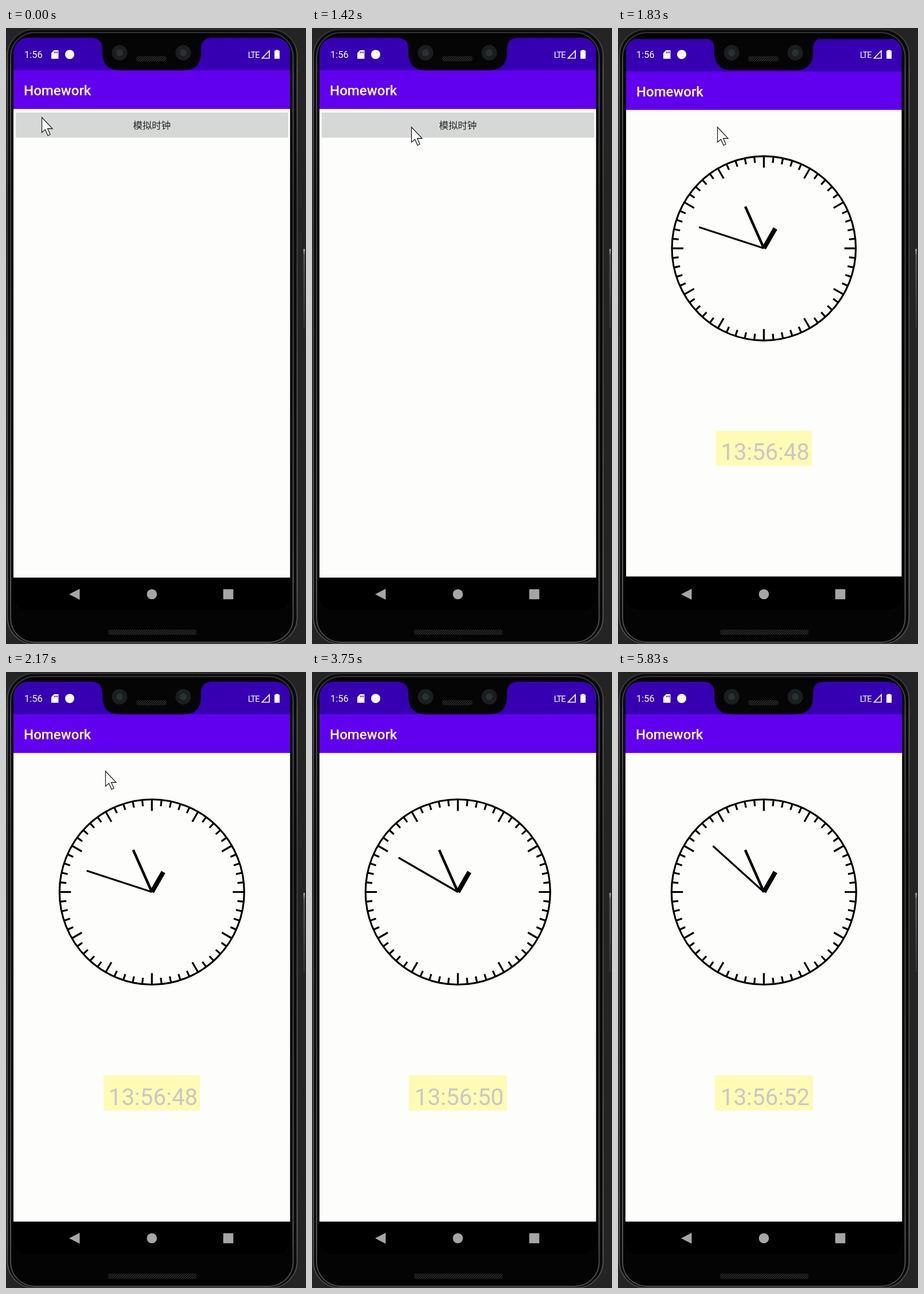
Recreate the animation shown at these times as an HTML page. Size 523 px wide and 1071 px high, loop 5.91 s.

```html
<!DOCTYPE html>
<html lang="zh">
<head>
<meta charset="utf-8">
<title>Homework</title>
<style>
html, body { margin: 0; width: 100%; height: 100%; overflow: hidden; background: #232323; }
svg { display: block; width: 100%; height: 100%; }
text { font-family: Roboto, sans-serif; }
.title { font-size: 24.1px; font-weight: 500; fill: #fff; }
.button { font: 16.4px "Noto Sans CJK SC", "Noto Sans CJK", sans-serif; fill: #222; }
</style>
</head>
<body>
<svg viewBox="0 0 523 1071">
  <defs>
    <clipPath id="screen"><rect x="13" y="17" width="482.5" height="995" rx="25"/></clipPath>
    <linearGradient id="rim" x2="0" y2="1">
      <stop offset="0" stop-color="#333"/><stop offset=".07" stop-color="#5c5c5c"/>
      <stop offset=".3" stop-color="#414141"/><stop offset=".9" stop-color="#606060"/>
      <stop offset="1" stop-color="#484848"/>
    </linearGradient>
    <linearGradient id="sideKey" x2="0" y2="1">
      <stop offset="0" stop-color="#bbb"/><stop offset=".08" stop-color="#5a5a5a"/><stop offset="1" stop-color="#333"/>
    </linearGradient>
    <pattern id="mesh" width="4" height="4" patternUnits="userSpaceOnUse">
      <rect width="4" height="4" fill="#0d0d0d"/><path d="M0 4L4 0" stroke="#444" stroke-width="1"/>
    </pattern>
    <g id="window">
      <rect x="13" y="17" width="482.5" height="57" fill="#3600b2"/>
      <rect x="13" y="73.5" width="482.5" height="68" fill="#6000ee"/>
      <rect x="13" y="140.8" width="482.5" height="815" fill="#fdfdfb"/>
      <rect x="13" y="955.7" width="482.5" height="57"/>
      <text class="title" x="31" y="117">Homework</text>
    </g>
  </defs>

  <!-- phone body -->
  <rect width="523" height="1071" fill="#242424"/>
  <rect x="518.5" y="384" width="2.5" height="138" rx="1" fill="url(#sideKey)"/>
  <rect x="2.5" y="2.5" width="505" height="1068" rx="46" fill="#0b0b0c" stroke="url(#rim)" stroke-width="1.8"/>
  <rect x="8" y="8" width="492.5" height="1060" rx="42" fill="#040405" stroke="url(#rim)" stroke-width="1.8"/>
  <rect x="178" y="1046" width="154" height="9" rx="3" fill="url(#mesh)"/>

  <g clip-path="url(#screen)">
    <rect x="13" y="17" width="482.5" height="995"/>
    <g id="menu">
      <use href="#window"/>
      <rect x="17" y="147.5" width="475" height="43" rx="2" fill="#c9cbcb"/>
      <rect x="17" y="147" width="475" height="43" rx="2" fill="#d6d8d8"/>
      <text class="button" x="254.3" y="175" text-anchor="middle">模拟时钟</text>
    </g>
    <g id="clock">
      <use href="#window"/>
      <g transform="translate(254.3 382.5)" stroke="#000" stroke-width="3.2" fill="none">
        <circle r="161"/>
        <g id="ticks"></g>
        <path d="M0 0V-40" stroke-width="8" transform="rotate(30)"/>
        <path d="M0 0V-80" stroke-width="4.5" transform="rotate(336)"/>
        <path id="secondHand" d="M0 0V-119.5"/>
      </g>
      <rect id="plate" y="701.5" height="61" fill="#fdfbb4"/>
      <text id="digits" y="752.5" font-size="40.3" text-anchor="middle" fill="#cac6c9"></text>
    </g>
  </g>

  <!-- notch -->
  <path d="M140 15V17H150Q167 18 168 35V44Q169 73.5 198 73.5H310Q339 73.5 340 44V35Q341 18 358 17H366V15Z" fill="#050505"/>
  <g fill="#1a1e1f">
    <circle cx="198" cy="43" r="13.5"/><circle cx="309" cy="43" r="13.5"/>
    <g fill="#2a3131"><circle cx="198" cy="43" r="6"/><circle cx="309" cy="43" r="6"/></g>
  </g>
  <rect x="227" y="49" width="53" height="9" rx="4" fill="url(#mesh)"/>

  <!-- status bar -->
  <g fill="#fff">
    <text x="32" y="52" font-size="16.4">1:56</text>
    <path d="M84 38.5H91.5V53.5H79V43.5Z"/>
    <path d="M84.5 41V44M87 41V44M89.5 41V44" stroke="#3600b2" stroke-width="1.2"/>
    <circle cx="111" cy="46" r="8"/>
    <text x="441.5" y="52" font-size="14.5" text-anchor="end" letter-spacing="-1">LTE</text>
    <path d="M446.5 52.5H459V39.5Z" fill="none" stroke="#fff" stroke-width="1.7"/>
    <path d="M470 38H475V39.5H477V53.5H468V39.5H470Z"/>
  </g>

  <!-- navigation bar -->
  <g fill="#a6a6a6">
    <path d="M110 984.5L128.5 975V994Z"/>
    <circle cx="254.3" cy="984.5" r="8.8"/>
    <rect x="378.7" y="975.7" width="17.6" height="17.6" rx="1"/>
  </g>

  <path id="cursor" d="M0 0V26L6 21L10.5 31.5L14.5 29.5L10 19.5H18.5Z" fill="#fff" stroke="#222" stroke-width="1.3"/>
</svg>
<script>
const LOOP = 5910, STEP = 250 / 3;
const $ = id => document.getElementById(id);

// Keyframes are [time, ...values], linear between neighbours.
function track(keys, t) {
  const next = keys.findIndex(key => key[0] > t);
  if (next < 0) return keys.at(-1).slice(1);
  if (next === 0) return keys[0].slice(1);
  const a = keys[next - 1], b = keys[next], u = (t - a[0]) / (b[0] - a[0]);
  return a.slice(1).map((v, i) => v + (b[i + 1] - v) * u);
}

const cursorPath = [
  [0, 62.5, 155.5], [170, 78, 158], [580, 160, 170], [750, 173.5, 172.5],
  [2250, 173.5, 172.5], [2420, 225, 125], [2670, 370, 5], [2750, 400, -40]
];
const opening = [[1620, 0], [1667, 0.06], [1750, 0.88], [1833, 0.97], [1917, 0.985], [2000, 0.995], [2080, 1]];

const zoom = s => `translate(254 514) scale(${s}) translate(-254 -514)`;

$("ticks").innerHTML = Array.from({ length: 60 }, (_, i) =>
  `<path d="M0 -161V${i % 5 ? -150 : -141}" transform="rotate(${i * 6})"/>`).join("");

function draw(time) {
  const t = Math.floor((time % LOOP + 5) / STEP) * STEP;

  const [progress] = track(opening, t);
  const opened = t > 1700;
  $("menu").style.display = opened ? "none" : "";
  $("clock").style.display = opened ? "" : "none";
  $("menu").setAttribute("transform", zoom(1 + 0.15 * progress));
  $("clock").setAttribute("transform", zoom(0.85 + 0.15 * progress));

  const second = 48 + Math.max(0, Math.floor((t - 1660) / 1000));
  const width = { 50: 171, 51: 161, 52: 171 }[second] || 168;
  $("secondHand").setAttribute("transform", `rotate(${second * 6})`);
  $("plate").setAttribute("x", 254.3 - width / 2);
  $("plate").setAttribute("width", width);
  $("digits").setAttribute("x", second === 51 ? 259.5 : 256.5);
  $("digits").textContent = "13:56:" + second;

  $("cursor").setAttribute("transform", `translate(${track(cursorPath, t)})`);
}

const start = performance.now();
function tick() {
  draw(performance.now() - start);
  requestAnimationFrame(tick);
}
tick();
</script>
</body>
</html>
```
